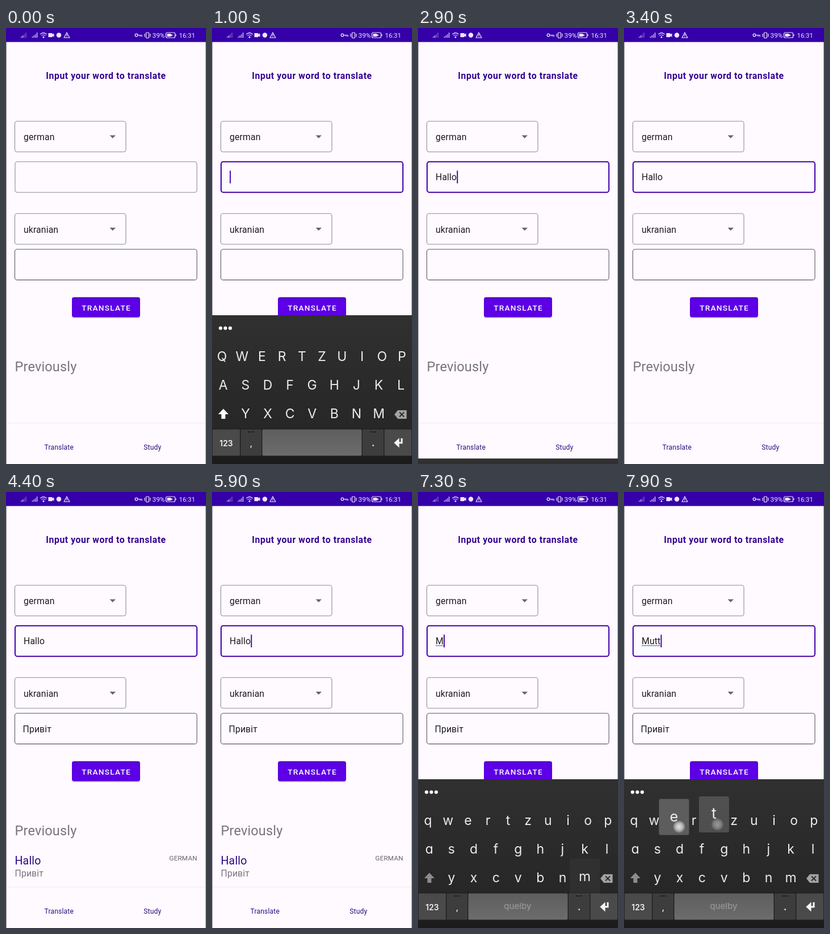
An HTML page that plays this animation: 352x762 px, repeating every 8000 ms.

```html
<!DOCTYPE html>
<html lang="en">
<head>
<meta charset="utf-8">
<title>Translator</title>
<style>
html, body { margin: 0; width: 100%; height: 100%; overflow: hidden; background: #fffaff; }
svg { display: block; width: 352px; height: 762px; }
text { font: 15.8px Roboto, sans-serif; letter-spacing: .12px; fill: #1d1b20; white-space: pre; }
.mid { text-anchor: middle; }
.title { font-weight: 700; font-size: 15.8px; letter-spacing: .56px; fill: #310090; }
.box { fill: none; stroke: #8f8b96; stroke-width: 1.1; }
.box.dark { stroke: #5c5862; }
.box.focus { stroke: #4100a8; stroke-width: 2; }
.arrow { fill: #68646e; }
.button { font-weight: 500; font-size: 13.7px; letter-spacing: 1.23px; fill: #fff; }
.head { font-size: 23.6px; fill: #78747e; }
.nav { font-size: 12px; letter-spacing: .2px; fill: #2f0a80; }
.word { font-size: 19.6px; fill: #2c0883; }
.gray { fill: #78747e; }
.lang { font-size: 11.8px; fill: #67636d; text-anchor: end; }
.status text { font-size: 11.8px; fill: #eee8ff; letter-spacing: 0; }
.status path, .status rect { fill: none; stroke: #eee8ff; stroke-width: 1.2; }
.status .solid { fill: #eee8ff; stroke: none; }
.keys text { font: 23px Inter, sans-serif; font-feature-settings: "cv11"; letter-spacing: 0; fill: #ececec; text-anchor: middle; }
.keys rect { fill: #606060; }
.kb .small { font: 600 14px Inter, sans-serif; letter-spacing: 0; fill: #eee; }
.kb .langs { font: 11px Inter, sans-serif; letter-spacing: 0; fill: #b4b4b4; }
.kb .brand { font: 500 15px Inter, sans-serif; letter-spacing: 0; fill: #959595; }
</style>
</head>
<body>
<svg viewBox="0 0 352 762">
  <defs>
    <linearGradient id="kbFill" x2="0" y2="1">
      <stop stop-color="#303030"/><stop offset=".75" stop-color="#272727"/><stop offset="1" stop-color="#1b1b1b"/>
    </linearGradient>
    <linearGradient id="spaceFill" x2="0" y2="1">
      <stop stop-color="#5e5e5e"/><stop offset="1" stop-color="#6c6c6c"/>
    </linearGradient>
    <radialGradient id="dotFill">
      <stop stop-color="#fff" stop-opacity=".85"/><stop offset=".6" stop-color="#ddd" stop-opacity=".7"/>
      <stop offset="1" stop-color="#999" stop-opacity=".45"/>
    </radialGradient>
    <clipPath id="buttonClip"><rect x="116" y="470.5" width="120" height="35" rx="4"/></clipPath>
  </defs>

  <rect width="352" height="762" fill="#fffaff"/>
  <path d="M.4 24V762M351.7 24V762" stroke="#5f5a66" stroke-width=".8"/>

  <g class="status">
    <rect width="352" height="24.5" style="fill:#3500a8;stroke:none"/>
    <path d="M27 17v-2M29.7 17v-4" />
    <path d="M32.4 17v-6M35.1 17v-9" opacity=".45"/>
    <path d="M46.500 17v-2M49.2 17v-4M51.9 17v-6M54.6 17v-9"/>
    <path d="M60.500 11q5.500-5 11 0M62.500 13.500q3.500-3 7 0"/>
    <circle class="solid" cx="66" cy="16" r="1.500"/>
    <path class="solid" d="M74.500 9h7v2l3-1.500v6l-3-1.500v2h-7z"/>
    <circle class="solid" cx="93" cy="12.500" r="4.200"/>
    <path d="M107 8l4.800 9h-9.600zM107 11v3M107 15v1"/>
    <circle cx="229.500" cy="12.500" r="2.300" fill="none" stroke="#eee8ff" stroke-width="1.300"/>
    <path d="M232 12.500h7v3M236 12.500v2.500"/>
    <rect x="246.500" y="8" width="5" height="9.500" rx="1"/>
    <path d="M244 10v5.500M254 10v5.500"/>
    <text x="257.500" y="17">39%</text>
    <rect x="281.500" y="8" width="16" height="9" rx="2"/>
    <path d="M299 11v3"/>
    <path class="solid" d="M283.500 10h6v5h-6zM288 9.500l6 3-6 3z"/>
    <text x="304.500" y="17" style="font-size:11.400px">16:31</text>
  </g>

  <text class="title mid" x="176" y="88.500">Input your word to translate</text>

  <rect class="box" x="15.500" y="163" width="195.500" height="53.500" rx="4"/>
  <text x="31" y="196.300">german</text>
  <path class="arrow" d="M182.500 187.500h10.500l-5.250 5.300z"/>
  <rect class="box" id="field" x="16" y="233.700" width="320" height="53.500" rx="4"/>
  <rect class="box" x="15.500" y="324.300" width="195.500" height="53.700" rx="4"/>
  <text x="31" y="357.500">ukranian</text>
  <path class="arrow" d="M182.500 349h10.500l-5.250 5.300z"/>
  <rect class="box dark" x="15.500" y="386.700" width="320.500" height="53.700" rx="4"/>

  <path id="under" stroke="#3aa5c4" stroke-width="1.500"/>
  <text id="typed" x="31" y="266.300"></text>
  <rect id="caret" y="249.300" width="1.900" height="22.200" fill="#4100a8"/>

  <rect x="116" y="472" width="120" height="35" rx="4" fill="#30005c" opacity=".22"/>
  <rect x="116" y="470.500" width="120" height="35" rx="4" fill="#5d00e6"/>
  <path d="M117 472h118" stroke="#4500b4" stroke-width="1.500"/>
  <circle id="ripple" cx="190" cy="489" fill="#fff" clip-path="url(#buttonClip)"/>
  <text class="button mid" x="176.600" y="493.500">TRANSLATE</text>

  <text class="head" x="15.500" y="599.700">Previously</text>
  <g id="result">
    <text x="29.500" y="419.800">Привіт</text>
    <text class="word" x="15.500" y="650.500">Hallo</text>
    <text class="gray" x="15.500" y="672.300">Привіт</text>
    <text class="lang" x="336.500" y="643.800">GERMAN</text>
  </g>

  <path d="M1 690.500H351" stroke="#f1ebf2"/>
  <text class="nav mid" x="93.300" y="737">Translate</text>
  <text class="nav mid" x="257.800" y="737">Study</text>

  <g class="kb" id="kb">
    <rect y="502" width="352" height="260" fill="url(#kbFill)"/>
    <g fill="#fff"><circle cx="15" cy="524.500" r="3.100"/><circle cx="23.500" cy="524.500" r="3.100"/><circle cx="32" cy="524.500" r="3.100"/></g>
    <rect y="700" width="352" height="48" fill="#202020"/>
    <path d="M1 701.500h48v46H1zM303.500 701.500H351v46h-47.500z" fill="#4a4a4a"/>
    <path d="M50.500 701.500H87v46H50.500zM265 701.500h37v46h-37z" fill="#3d3d3d"/>
    <rect x="88.500" y="701.500" width="175" height="46" rx="2" fill="url(#spaceFill)"/>
    <path d="M64 706h10M278.500 706h10" stroke="#111" stroke-width="2" stroke-dasharray="2 2"/>
    <text class="small mid" x="25" y="731">123</text>
    <text class="small mid" x="69" y="731">,</text>
    <text class="small mid" x="283.500" y="731" style="font-size:18px">.</text>
    <path d="M334 717v8h-11M328 720l-5.500 5 5.500 5z" fill="none" stroke="#f4f4f4" stroke-width="3"/>
    <g id="langs">
      <text class="langs mid" x="176.500" y="729">UK · DE · EN</text>
      <path d="M135 721v8l-7-4zM216.500 721v8l7-4z" fill="#858585"/>
    </g>
    <text class="brand mid" id="brand" x="175.500" y="728.500">quelby</text>
    <path id="shift" d="M20 665.500l9 9.500h-5.500v8h-7v-8H11z"/>
    <path d="M321 675.500l6-7.500h15.500v15H327z" fill="#a2a2a2"/>
    <path d="M330 671.500l8 8m0-8l-8 8" stroke="#2b2b2b" stroke-width="1.800"/>
    <g class="keys" id="keys"></g>
  </g>
  <g id="dots"></g>
</svg>
<script>
const LOOP = 8000, FADE = 140, RAISE = 11;
const $ = id => document.getElementById(id);
const clamp = v => Math.max(0, Math.min(1, v));
const ramp = (t, from, length) => clamp((t - from) / length);
const easeOut = v => 1 - (1 - v) ** 3;

function make(tag, attrs, parent) {
  const el = document.createElementNS('http://www.w3.org/2000/svg', tag);
  set(el, attrs);
  parent.append(el);
  return el;
}
function set(el, attrs) {
  for (const name in attrs) el.setAttribute(name, attrs[name]);
}

// Key caps
const keys = {};
const rows = [['qwertzuiop', 17.6, 35.2, 574], ['asdfghjkl', 19.8, 39.1, 624], ['yxcvbnm', 59, 39.1, 674]];
for (const [letters, x0, step, y] of rows) {
  [...letters].forEach((letter, i) => {
    const x = x0 + step * i;
    const g = make('g', {}, $('keys'));
    const pad = make('rect', { x: x - 26.5, y: y - 31, width: 53, height: 63, rx: 3 }, g);
    keys[letter] = { x, y, g, pad, label: make('text', {}, g) };
  });
}

// Key presses: key, down, up; "<" is backspace
const presses = [
  ['h', 1220, 1300], ['a', 1500, 1590], ['l', 1680, 1760], ['l', 1880, 1970], ['o', 2200, 2290],
  ...[0, 1, 2, 3, 4].map(i => ['<', 6780 + 70 * i, 6820 + 70 * i]),
  ['m', 7120, 7180], ['u', 7510, 7600], ['t', 7640, 7710], ['t', 7790, 7860], ['e', 7865, 8100]
];
const touchShift = { l: [6, 1], e: [9, 11], '<': [0, 0] };

// Touches: x, y, down, up
const touches = [
  [248, 262, 690, 770], [190, 489, 4090, 4180], [258, 260, 6220, 6300],
  ...presses.map(([key, down, up]) => {
    const { x, y } = keys[key] || { x: 331, y: 676 };
    const [dx, dy] = touchShift[key] || [6, 7];
    return [x + dx, y + dy, down, up];
  })
].map(([x, y, down, up]) => ({
  down, up, el: make('circle', { cx: x, cy: y, r: 10.5, fill: 'url(#dotFill)' }, $('dots'))
}));

function textAt(t) {
  let s = '';
  for (const [key, , up] of presses) {
    if (up > t) break;
    s = key === '<' ? s.slice(0, -1) : s + (s ? key : key.toUpperCase());
  }
  return s;
}

function caretOn(t) {
  if (t < 3400) return t >= 700;
  return t >= 5900 || Math.floor((t - 3400) / 500) % 2 === 1;
}

function drawField(t, text) {
  $('field').classList.toggle('focus', t >= 700);
  $('typed').textContent = text;
  const end = 31 + (text ? $('typed').getComputedTextLength() : 0);
  set($('caret'), { x: end + .2, opacity: +caretOn(t) });
  const composing = text && (t < 2800 || t > 7150);
  set($('under'), { d: `M31 268.5H${end}`, opacity: composing ? 1 : 0 });
}

function drawKeyboard(t, text) {
  const open = easeOut(ramp(t, 760, 180)) - easeOut(ramp(t, 2780, 180)) + easeOut(ramp(t, 6280, 180));
  set($('kb'), { transform: `translate(0 ${260 * (1 - open)})`, visibility: open > 0 ? 'visible' : 'hidden' });
  set($('langs'), { opacity: t < 4000 ? ramp(t, 1050, 200) : 0 });
  set($('brand'), { opacity: t < 4000 ? 0 : 1 });
  set($('shift'), { fill: text ? '#8c8c8c' : '#fff' });

  for (const letter in keys) {
    const { x, y, g, pad, label } = keys[letter];
    let glow = 0, lift = 0;
    for (const [key, down, up] of presses) {
      if (key !== letter || t < down) continue;
      const a = 1 - ramp(t, up, FADE);
      glow = Math.max(glow, a);
      lift = Math.max(lift, Math.min(ramp(t, down, 60), a * 1.6));
    }
    set(g, { transform: `translate(0 ${-RAISE * lift})` });
    set(pad, { opacity: glow * .95 });
    label.textContent = text ? letter : letter.toUpperCase();
    set(label, { transform: `translate(${x} ${y + 8.2}) scale(${1 + .18 * lift})` });
  }
}

function draw(t) {
  const text = textAt(t);
  drawField(t, text);
  drawKeyboard(t, text);
  set($('result'), { opacity: t >= 4300 ? 1 : 0 });
  set($('ripple'), { r: 80 * easeOut(ramp(t, 4090, 220)), opacity: t < 4090 ? 0 : .28 * (1 - ramp(t, 4200, 190)) });
  for (const { el, down, up } of touches) {
    set(el, { opacity: t < down ? 0 : 1 - ramp(t, up, 80) });
  }
}

let start;
function tick(now) {
  start ??= now;
  draw((now - start) % LOOP);
  requestAnimationFrame(tick);
}
draw(0);
requestAnimationFrame(tick);
</script>
</body>
</html>
```
